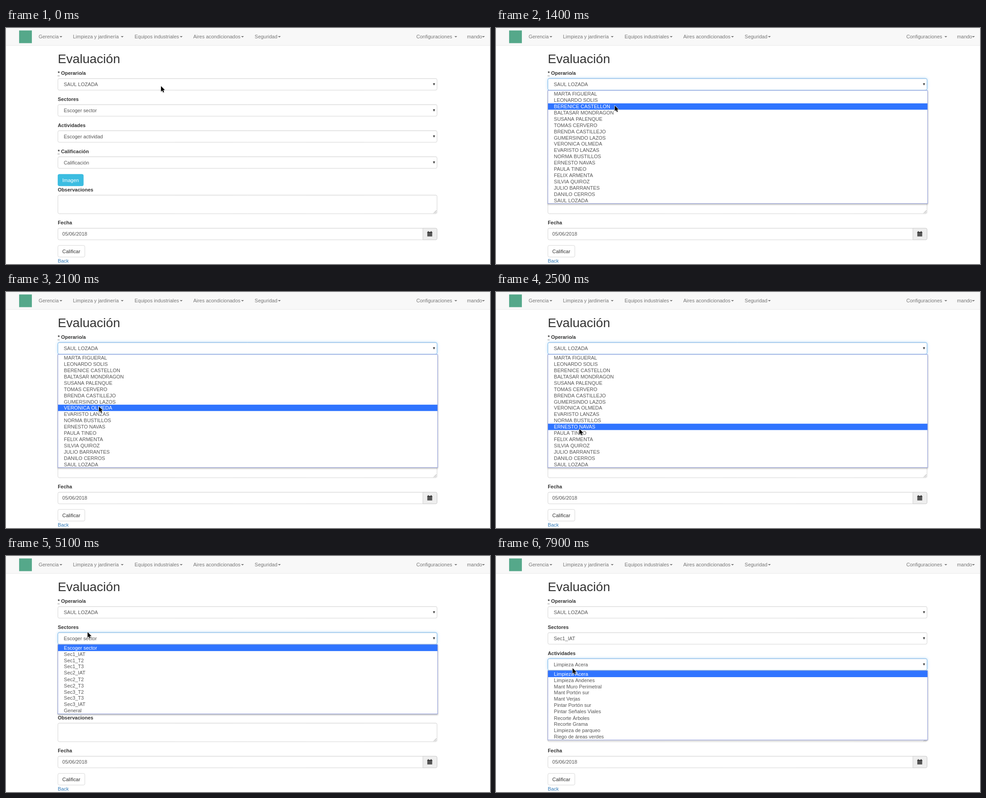
Animation of 1068 by 524 pixels, one loop 8000 ms. Source, as an HTML page with a canvas:

```html
<!DOCTYPE html>
<html lang="es">
<head>
<meta charset="utf-8">
<title>Evaluación</title>
<style>
html, body { margin: 0; width: 100%; height: 100%; overflow: hidden; background: #fff; }
canvas { display: block; width: 1068px; height: 524px; }
</style>
</head>
<body>
<canvas id="stage" width="1068" height="524"></canvas>
<script>
const ctx = document.getElementById('stage').getContext('2d');
const LOOP = 8000;
const SCALE = 1068 / 1366; // the page is laid out 1366 units wide
const LEFT = 146, WIDTH = 1071, RIGHT = LEFT + WIDTH;
const ROW = 17.8;
const FONT = '"Liberation Sans", Arial, sans-serif';

const OPERATOR = 'SAUL LOZADA';
const operators = ['MARTA FIGUERAL', 'LEONARDO SOLIS', 'BERENICE CASTELLON', 'BALTASAR MONDRAGON',
  'SUSANA PALENQUE', 'TOMAS CERVERO', 'BRENDA CASTILLEJO', 'GUMERSINDO LAZOS', 'VERONICA OLMEDA',
  'EVARISTO LANZAS', 'NORMA BUSTILLOS', 'ERNESTO NAVAS', 'PAULA TINEO', 'FELIX ARMENTA',
  'SILVIA QUIROZ', 'JULIO BARRANTES', 'DANILO CERROS', OPERATOR];
const sectors = ['Escoger sector', 'Sec1_IAT', 'Sec1_T2', 'Sec1_T3', 'Sec2_IAT', 'Sec2_T2',
  'Sec2_T3', 'Sec3_T2', 'Sec3_T3', 'Sec3_IAT', 'General'];
const activities = ['Limpieza Acera', 'Limpieza Andenes', 'Mant Muro Perimetral', 'Mant Portón sur',
  'Mant Verjas', 'Pintar Portón sur', 'Pintar Señales Viales', 'Recorte Árboles', 'Recorte Grama',
  'Limpieza de parqueo', 'Riego de áreas verdes'];

// label, text x, caret x
const menu = [
  ['Gerencia', 92, 151], ['Limpieza y jardinería', 189, 324], ['Equipos industriales', 363, 490.5],
  ['Aires acondicionados', 528.5, 663.5], ['Seguridad', 702, 767.5],
  ['Configuraciones', 1158, 1265.5], ['mando', 1301, 1343.5]
];

// time, x, y of the pointer tip in stage pixels
const glide = [[700, 342, 129], [900, 327, 134], [1500, 249, 180], [1700, 228, 201],
  [2400, 188, 294], [2500, 184, 304]];
const jumps = [[4300, 181, 160], [4700, 180, 169], [5600, 175, 199], [6000, 167, 226],
  [6400, 168, 216], [7900, 169, 249]];

function pointerAt(t) {
  const jump = jumps.filter(p => p[0] <= t).pop();
  if (jump) return jump.slice(1);
  const next = glide.findIndex(p => p[0] > t);
  if (next < 0) return glide[glide.length - 1].slice(1);
  if (next === 0) return glide[0].slice(1);
  const a = glide[next - 1], b = glide[next], k = (t - a[0]) / (b[0] - a[0]);
  return [a[1] + (b[1] - a[1]) * k, a[2] + (b[2] - a[2]) * k];
}

function text(str, x, y, color = '#555', size = 14, weight = '') {
  ctx.font = `${weight} ${size}px ${FONT}`;
  ctx.fillStyle = color;
  ctx.fillText(str, x, y);
}

function rect(x, y, w, h, color) {
  ctx.fillStyle = color;
  ctx.fillRect(x, y, w, h);
}

function polygon(points, fill) {
  ctx.beginPath();
  points.forEach(([x, y]) => ctx.lineTo(x, y));
  ctx.closePath();
  ctx.fillStyle = fill;
  ctx.fill();
}

function shadow(color, blur = 0, y = 0) {
  ctx.shadowColor = color;
  ctx.shadowBlur = blur * SCALE;
  ctx.shadowOffsetY = y * SCALE;
}
const noShadow = () => shadow('transparent');

function box(x, y, w, h, { fill = '#fff', border = '#ccc', radius = 4, glow = false } = {}) {
  ctx.beginPath();
  ctx.roundRect(x + .5, y + .5, w - 1, h - 1, radius);
  if (glow) shadow('rgba(102,175,233,.6)', 8);
  ctx.fillStyle = fill;
  ctx.fill();
  noShadow();
  ctx.strokeStyle = border;
  ctx.lineWidth = 1;
  ctx.stroke();
}

function field(y, h, w = WIDTH, focused = false) {
  box(LEFT, y, w, h, { border: focused ? '#4f9fe4' : '#c8c8c8', glow: focused });
  rect(LEFT + 3, y + 1, w - 6, 1, 'rgba(0,0,0,.06)');
}

function label(str, y, required) {
  if (!required) return text(str, LEFT, y, '#333', 14, 'bold');
  text('* ' + str, LEFT, y, '#333', 14, 'bold');
  for (let x = LEFT; x < LEFT + 6; x += 2) {
    rect(x, y + 1.5, 1, 1, '#333');
    rect(x, y + 4, 1, 1, '#777');
  }
}

function select(y, value, focused) {
  field(y, 34, WIDTH, focused);
  text(value, LEFT + 17, y + 22);
  polygon([[1205, y + 14], [1211, y + 14], [1208, y + 20.5]], '#333');
}

function navbar() {
  rect(0, 0, 1366, 50, '#f8f8f8');
  rect(0, 49, 1366, 1, '#e4e4e4');
  rect(37, 7, 36, 36, '#55a88a');
  for (const [name, x, caret] of menu) {
    text(name, x, 29, '#777');
    polygon([[caret, 23], [caret + 8, 23], [caret + 4, 27]], '#777');
  }
}

function calendarIcon(x, y) {
  rect(x, y + 2, 14, 4, '#333');
  rect(x + 2, y, 2, 3, '#333');
  rect(x + 10, y, 2, 3, '#333');
  rect(x, y + 6, 14, 9, '#777');
  for (let row = 0; row < 3; row++)
    for (let col = 0; col < 5; col++)
      rect(x + .5 + col * 2.7, y + 7 + row * 2.7, 1.9, 1.9, '#333');
}

function lowerForm() {
  box(LEFT, 415, 73, 34, { fill: '#3cbde1', border: '#36b9de' });
  text('Imagen', 159, 437, '#fff');

  label('Observaciones', 464);
  field(474, 54);
  ctx.strokeStyle = '#777';
  ctx.beginPath();
  for (const d of [8, 4]) {
    ctx.moveTo(RIGHT - 2 - d, 526);
    ctx.lineTo(RIGHT - 2, 526 - d);
  }
  ctx.stroke();

  label('Fecha', 558);
  field(568, 34);
  text('05/06/2018', 159, 590);
  ctx.beginPath();
  ctx.roundRect(1176.5, 568.5, 40, 33, [0, 4, 4, 0]);
  ctx.fillStyle = '#eee';
  ctx.fill();
  ctx.strokeStyle = '#c8c8c8';
  ctx.stroke();
  calendarIcon(1189, 577);

  box(LEFT, 617, 77, 34);
  text('Calificar', 159, 639, '#333');
  text('Back', LEFT, 666, '#337ab7');
}

function dropdown(y, items, active) {
  const x = LEFT, w = WIDTH + 1.5, h = Math.round(items.length * ROW + 2);
  shadow('rgba(0,0,0,.3)', 4, 2);
  rect(x, y, w, h, '#fff');
  noShadow();
  ctx.strokeStyle = '#7181d3';
  ctx.lineWidth = 1;
  ctx.strokeRect(x + .5, y + .5, w - 1, h - 1);
  items.forEach((item, i) => {
    const top = y + 1 + Math.round(i * ROW);
    if (i === active) rect(x + 1, top, w - 2, 18, '#2f74ff');
    text(item, LEFT + 17.5, top + 14, i === active ? '#fff' : '#555');
  });
}

function pointer(x, y) {
  ctx.save();
  ctx.translate(x / SCALE, y / SCALE);
  ctx.scale(.92, .92);
  const arrow = [[0, 0], [0, 17], [4, 13.3], [6.7, 19.5], [9.4, 18.3], [6.8, 12.3], [12, 12.3]];
  shadow('rgba(0,0,0,.4)', 3, 1.5);
  polygon(arrow, '#000');
  noShadow();
  ctx.strokeStyle = '#fff';
  ctx.lineWidth = 2;
  ctx.lineJoin = 'round';
  ctx.stroke();
  polygon(arrow, '#000');
  ctx.restore();
}

function hoveredOperator(tipY) {
  const row = Math.floor(((tipY - 2) / SCALE - 178) / ROW);
  return row < 0 ? operators.length - 1 : row;
}

function draw(time) {
  const t = Math.floor(time / 100) * 100;
  const [px, py] = pointerAt(t);
  const operatorOpen = t >= 700 && t < 4300;
  const sectorOpen = t >= 5100 && t < 7900;
  const activityOpen = t >= 7900;

  ctx.setTransform(SCALE, 0, 0, SCALE, 0, 0);
  rect(0, 0, 1366, 680, '#fff');
  navbar();
  text('Evaluación', LEFT, 100, '#333', 36);

  label('Operario/a', 133, true);
  select(143, OPERATOR, t >= 700 && t < 5100);
  label('Sectores', 207);
  select(217, sectors[activityOpen ? 1 : 0], sectorOpen);
  label('Actividades', 281);
  select(291, activityOpen ? activities[0] : 'Escoger actividad', activityOpen);
  label('Calificación', 355, true);
  select(365, 'Calificación');
  lowerForm();

  if (operatorOpen) dropdown(177, operators, hoveredOperator(py));
  if (sectorOpen) dropdown(251, sectors, t < 6000 ? 0 : 2);
  if (activityOpen) dropdown(325, activities, 0);
  pointer(px, py);
}

const start = performance.now();
function frame() {
  draw((performance.now() - start) % LOOP);
  requestAnimationFrame(frame);
}
frame();
</script>
</body>
</html>
```
